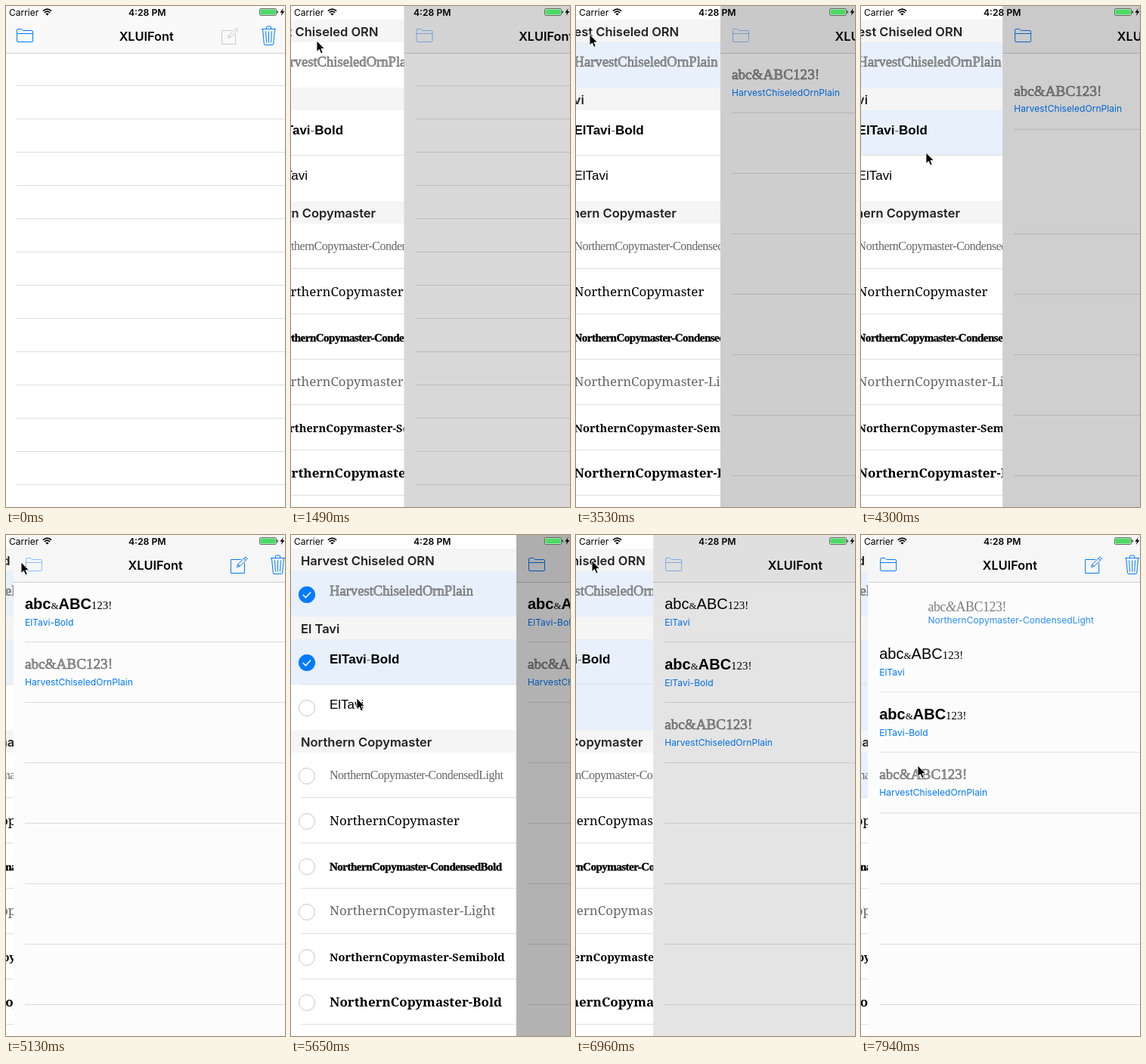
Recreate the animation shown at these times as an HTML page. Size 369 px wide and 663 px high, loop 8000 ms.

```html
<!DOCTYPE html>
<html lang="en">
<head>
<meta charset="utf-8">
<title>Font picker</title>
<style>
html, body { margin: 0; width: 100%; height: 100%; overflow: hidden; background: #fff; }
svg { display: block; width: 100vw; height: 100vh; }
text { white-space: pre; }
.ui { font-family: Inter, Roboto, sans-serif; }
.head { font-size: 16.5px; font-weight: 600; fill: #222; }
.sub { font-size: 12.1px; fill: #007aff; }
.engraved { font-family: "Liberation Serif", serif; fill: #a2a2a2; stroke: #4c4c4c; stroke-width: .5; }
.sans { font-family: "Liberation Sans", Arial, sans-serif; }
.times { font-family: "Liberation Serif", serif; font-weight: 400; }
.slab { font-family: "Noto Serif", serif; }
.narrow { font-family: "Liberation Serif", serif; letter-spacing: -.5px; }
.light { fill: #666; font-weight: 300; }
.bold { font-weight: 700; }
.semi { font-weight: 600; }
.heavy { font-weight: 700; stroke: #000; stroke-width: .4; }
.line { fill: none; stroke: #007aff; }
</style>
</head>
<body>
<svg viewBox="0 0 369 663" preserveAspectRatio="none">
  <g id="drawer"></g>
  <g id="page">
    <rect width="375" height="663" fill="#fff"/>
    <g id="fillers"></g>
    <g id="cells"></g>
    <rect width="375" height="62" fill="#f9f9f9"/>
    <rect y="62" width="375" height="1" fill="#cfcfd1"/>
    <text class="ui" x="187.7" y="46" font-size="16.3" font-weight="600" text-anchor="middle">XLUIFont</text>
    <path id="folder" class="line" d="M16.5 46V32Q16.5 30.5 18 30.5H22.5L24.5 32.5H36Q37.5 32.5 37.5 34V46Q37.5 47.5 36 47.5H18Q16.5 47.5 16.5 46ZM16.5 36.5H37.5"/>
    <path id="edit" class="line" d="M301 32.5H287.5V50.5H305.5V37M295.5 42.5L296.8 38.8 306.8 28.8 309.3 31.3 299.3 41.3ZM304.8 30.8L307.3 33.3M296.8 38.8L299.3 41.3"/>
    <path class="line" d="M340 30.5H359M346.5 30.5V28Q346.5 27 347.5 27H351.5Q352.5 27 352.5 28V30.5M341.5 30.5L343.3 50Q343.5 51.5 345 51.5H354Q355.5 51.5 355.7 50L357.5 30.5M345.5 33.5L346.5 48.5M349.5 33.5V48.5M353.5 33.5L352.5 48.5"/>
    <rect id="dim" width="375" height="663"/>
  </g>
  <g class="ui">
    <text x="4" y="12.5" font-size="12">Carrier</text>
    <text x="162" y="12.5" font-size="12.2" font-weight="600">4:28 PM</text>
    <path d="M48.9 6.6Q54.5 1.6 60.1 6.6M50.9 8.8Q54.5 5.6 58.1 8.8" fill="none" stroke="#000" stroke-width="1.7"/>
    <path d="M52.4 10.4Q54.5 8.7 56.6 10.4L54.5 12.6Z"/>
    <rect x="335.5" y="3.5" width="22" height="9" rx="1.6" fill="#fff" stroke="#444" stroke-width=".8"/>
    <rect x="336.4" y="4.4" width="20.2" height="7.2" rx=".8" fill="#4cd964"/>
    <path d="M358.4 6.2Q360 6.4 360 8T358.4 9.8Z" fill="#333"/>
    <path d="M366.6 3L362.4 8.7H365L363.8 13 368.4 7.1H365.7Z"/>
  </g>
  <path id="cursor" d="M0 0V14.6L3.4 11.5 5.7 16.9 8.2 15.8 5.9 10.6H10.5Z" stroke="#fff" stroke-width=".9"/>
</svg>
<script>
const LOOP = 8000, WIDE = 300, OPEN_MS = 300, CLOSE_MS = 250, INSERT_MS = 300;
const SEP = '#dedee0';
const opens = [1340, 3352, 5095, 6842];
const picks = [2380, 4198, 5917, 7720];

// [start, end, x, y] of each pointer move
const moves = [
  [380, 460, 267, 180], [640, 1010, 34, 46], [1780, 2080, 69, 83],
  [2850, 3140, 18, 37.5], [3590, 3910, 86, 194], [4520, 4830, 20, 36],
  [5340, 5650, 87, 216], [6240, 6630, 21, 34], [7150, 7460, 75, 305]
];

const $ = id => document.getElementById(id);
const clamp = v => Math.max(0, Math.min(1, v));
const ease = v => (v = clamp(v), v * v * (3 - 2 * v));
const rect = (x, y, w, h, fill, more = '') =>
  `<rect x="${x}" y="${y}" width="${w}" height="${h}" fill="${fill}" ${more}/>`;
const text = (cls, x, y, size, str) =>
  `<text class="${cls}" x="${x}" y="${y}"${size ? ` font-size="${size}"` : ''}>${str}</text>`;
const dash = '<tspan font-weight="400" fill="#666">-</tspan>';

// Rows: [class, size, baseline, label, index of the pick that selects it]
const sections = [
  ['Harvest Chiseled ORN', [['engraved', 18.6, 31.5, 'HarvestChiseledOrnPlain', 0]]],
  ['El Tavi', [
    ['sans bold', 17, 32, `ElTavi${dash}Bold`, 1],
    ['sans', 17, 32, 'ElTavi', 2]]],
  ['Northern Copymaster', [
    ['narrow light', 16, 35, 'NorthernCopymaster-CondensedLight', 3],
    ['slab', 17, 36, 'NorthernCopymaster'],
    ['narrow heavy', 15, 36, 'NorthernCopymaster-CondensedBold'],
    ['slab light', 17, 35, 'NorthernCopymaster-Light'],
    ['slab semi', 14.6, 36, 'NorthernCopymaster-Semibold'],
    ['slab bold', 17, 36, 'NorthernCopymaster-Bold'],
    ['slab', 17, 36, '']]]
];

function buildDrawer() {
  let y = 18, out = rect(0, 0, WIDE, 663, '#fff');
  for (const [title, rows] of sections) {
    out += rect(0, y, WIDE, 30, '#f5f5f5') + text('ui head', 15, y + 22, 0, title);
    y += 30;
    rows.forEach(([cls, size, base, label, pick], i) => {
      const mid = y + 31;
      if (pick >= 0) out += rect(0, y, WIDE, 60, '#e7f0fb', `class="on${pick}"`);
      out += `<circle cx="23" cy="${mid}" r="10.5" fill="#fff" stroke="#c7c7cc"/>`;
      if (pick >= 0) out += `<g class="on${pick}"><circle cx="23" cy="${mid}" r="11" fill="#007aff"/>` +
        `<path d="M17.8 ${mid}l3.6 3.8 6.8-7.2" fill="none" stroke="#fff" stroke-width="1.5"/></g>`;
      out += text(cls, 53, y + base, size, label);
      if (i < rows.length - 1) out += rect(15, y + 59, WIDE, 1, SEP);
      y += 60;
    });
  }
  $('drawer').innerHTML = out;
}

const mixed = '<tspan>abc</tspan><tspan class="times" font-size="13">&amp;</tspan>' +
  '<tspan>ABC</tspan><tspan class="times" font-size="15">123!</tspan>';

// Cells: [class, size, baseline, sample, label baseline, label], oldest first
const fonts = [
  ['engraved', 19.2, 35, 'abc&amp;ABC123!', 56.5, 'HarvestChiseledOrnPlain'],
  ['sans bold', 20, 36, mixed, 58, 'ElTavi-Bold'],
  ['sans', 20, 36, mixed, 58, 'ElTavi'],
  ['narrow light', 18, 39, 'abc<tspan font-style="italic">&amp;</tspan>ABC123!', 55, 'NorthernCopymaster-CondensedLight']
];

function buildCells() {
  $('cells').innerHTML = fonts.map(([cls, size, base, sample, subBase, label], i) =>
    `<g id="cell${i}">` + rect(0, 0, 375, 80, '#fff') + text(cls, 15, base, size, sample) +
    text('ui sub', 15, subBase, 0, label) + rect(15, 79, 360, 1, SEP) + '</g>').reverse().join('');
}

const lines = (step, first) => {
  let out = '';
  for (let y = 61 + step * (first + 1); y < 663; y += step) out += rect(15, y, 360, 1, SEP);
  return out;
};

function pointer(t) {
  let x = 335, y = 214;
  for (const [a, b, tx, ty] of moves) {
    // the first step is already under way when it shows
    const k = ease((t - a + 20) / (b - a + 20));
    x += (tx - x) * k;
    y += (ty - y) * k;
  }
  return [x, y];
}

let shownCount = -1;

function draw(t) {
  let slide = 0, press = 0;
  opens.forEach((o, i) => {
    slide += ease((t - o) / OPEN_MS) - ease((t - picks[i]) / CLOSE_MS);
    if (t >= o - 5) press = Math.max(press, 1 - clamp((t - o - 430) / 110));
  });
  const s = slide * WIDE;
  $('page').setAttribute('transform', `translate(${s - 2})`);
  $('drawer').setAttribute('transform', `translate(${(s - WIDE) / 2 - 2})`);
  $('dim').setAttribute('opacity', .3 * slide);
  $('folder').setAttribute('opacity', 1 - .55 * press);

  const count = picks.filter(p => t >= p).length;
  if (count !== shownCount) {
    shownCount = count;
    $('fillers').innerHTML = count ? lines(80, count) : lines(44, 0);
    $('edit').style.stroke = count ? '#007aff' : '#c9c9cb';
    picks.forEach((p, i) => document.querySelectorAll('.on' + i)
      .forEach(e => e.style.display = i < count ? '' : 'none'));
  }

  let y = 62;
  for (let i = fonts.length - 1; i >= 0; i--) {
    const cell = $('cell' + i), k = ease((t - picks[i]) / INSERT_MS);
    cell.style.display = i < count ? '' : 'none';
    cell.setAttribute('transform', `translate(${(1 - k) * 375} ${y})`);
    cell.setAttribute('opacity', k);
    y += 80 * k;
  }

  $('cursor').style.display = t < 380 ? 'none' : '';
  $('cursor').setAttribute('transform', `translate(${pointer(t)})`);
}

buildDrawer();
buildCells();
const start = performance.now();
function tick() {
  draw((performance.now() - start) % LOOP);
  requestAnimationFrame(tick);
}
tick();
</script>
</body>
</html>
```
